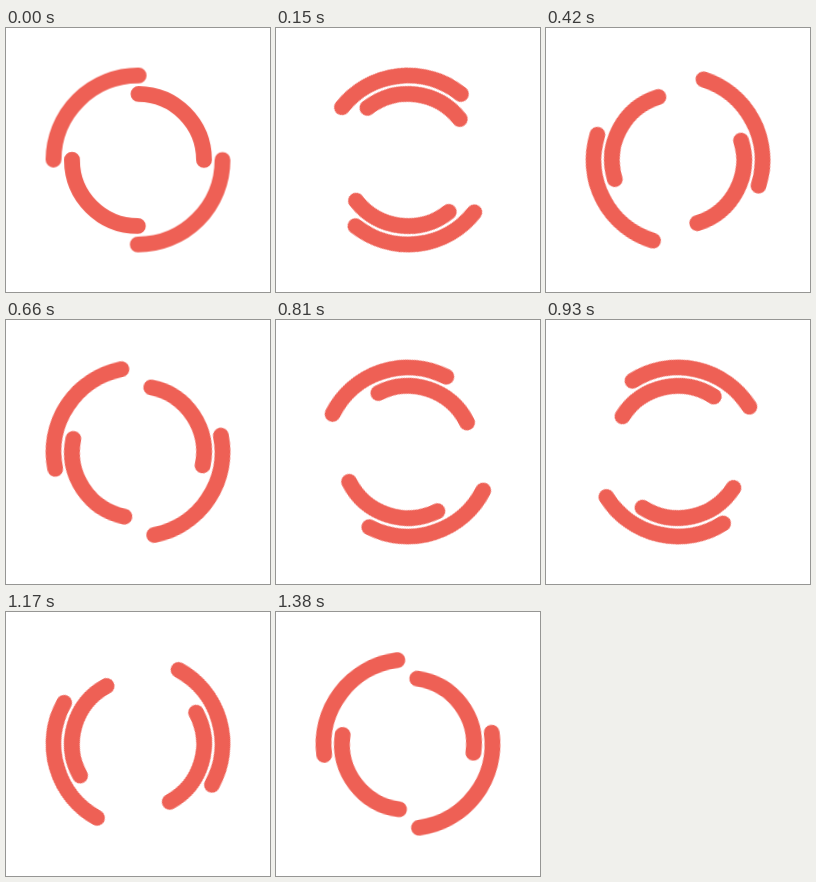
Write an HTML page that moves like this. It is 264 by 264 pixels and loops after 1.41 s.

```html
<!DOCTYPE html>
<html lang="en">
<head>
<meta charset="utf-8">
<title>Double ring</title>
<style>
  html, body { margin: 0; width: 100%; height: 100%; overflow: hidden; background: #fff; }
  svg { display: block; width: 100vw; height: 100vh; }
  circle {
    fill: none;
    stroke: #ee6055;
    stroke-width: 6;
    stroke-linecap: round;
    transform-origin: 50px 50px;
  }
</style>
</head>
<body>
<svg viewBox="0 0 100 100">
  <circle id="outer" cx="50" cy="50" r="32"/>
  <circle id="inner" cx="50" cy="50" r="25"/>
</svg>
<script>
  const LOOP = 1410, STEPS = 47;

  // Two opposite quarter arcs, turning once per loop.
  function ring(id, startQuarter, turn) {
    const el = document.getElementById(id);
    const quarter = el.r.baseVal.value * Math.PI / 2;
    el.style.strokeDasharray = `${quarter} ${quarter}`;
    el.style.strokeDashoffset = startQuarter * quarter;
    return el.animate(
      { transform: ['rotate(0deg)', `rotate(${turn}deg)`] },
      { duration: LOOP, iterations: Infinity, easing: `steps(${STEPS}, end)` }
    );
  }

  const spins = [ring('outer', 0, 360), ring('inner', 1, -360)];
  for (const spin of spins) spin.startTime = document.timeline.currentTime;
</script>
</body>
</html>
```
